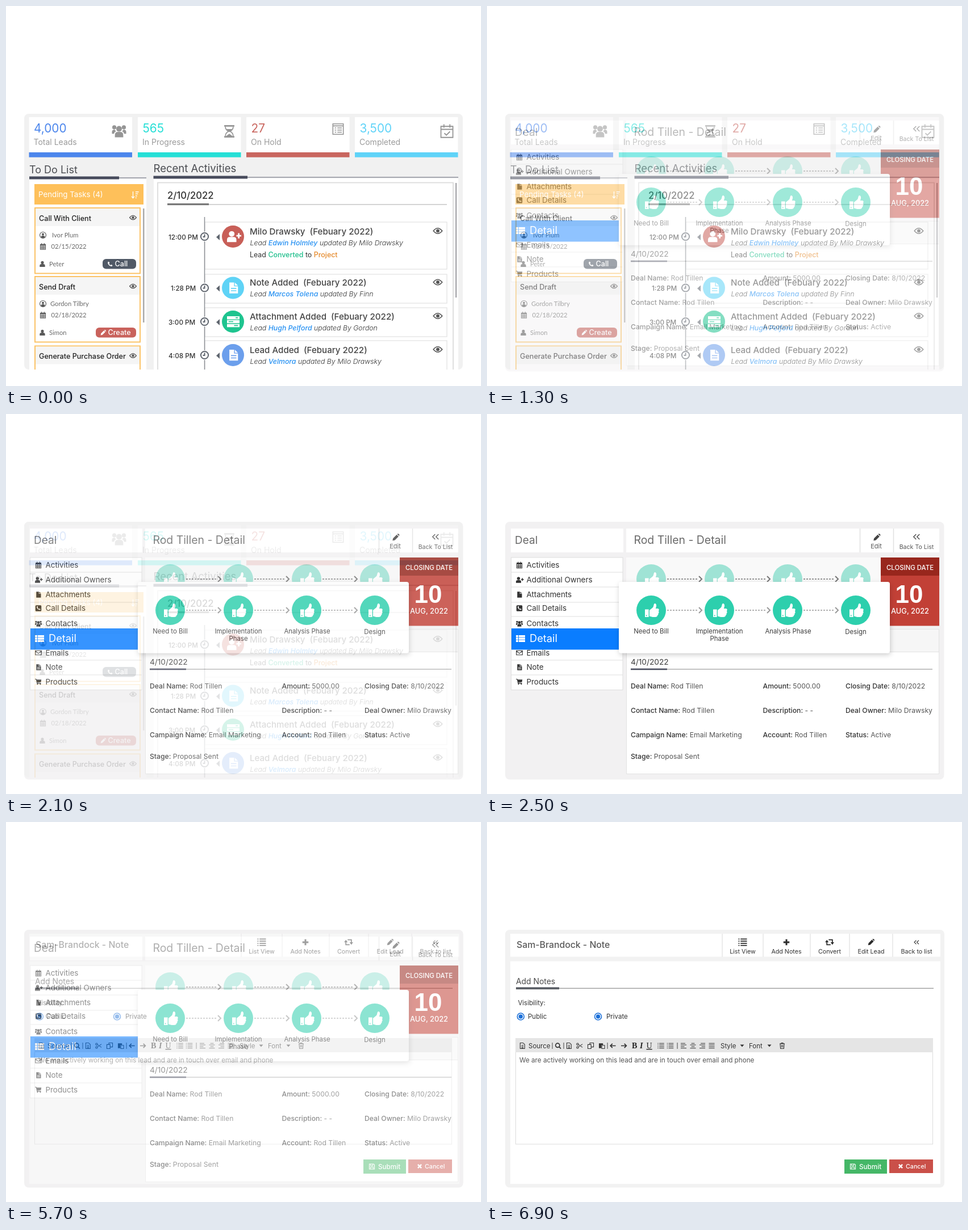
These frames come from a looping animation (836 by 670 pixels, 8 s). An HTML page:

```html
<!DOCTYPE html>
<html lang="en">
<head>
<meta charset="utf-8">
<title>Lead dashboard</title>
<style>
html, body { margin: 0; width: 100%; height: 100%; overflow: hidden; background: #fff; }
svg { display: block; width: 100%; height: 100%; }
text { font-family: Inter, sans-serif; white-space: pre; }
</style>
</head>
<body>
<svg id="stage" viewBox="0 0 836 670"></svg>
<script>
const LOOP = 8000, STEP = 200, STEPS = 11;
const dot = (x, y, r) => `M${x - r} ${y}a${r} ${r} 0 1 0 ${2 * r} 0a${r} ${r} 0 1 0 ${-2 * r} 0z`;

// Drawing helpers: each returns SVG markup
const rect = (x, y, w, h, fill, extra = '') =>
  `<rect x="${x}" y="${y}" width="${w}" height="${h}" fill="${fill}" ${extra}/>`;
const box = (x, y, w, h, stroke, sw = 1, fill = '#fff') =>
  rect(x, y, w, h, fill, `stroke="${stroke}" stroke-width="${sw}"`);
const line = (x1, y1, x2, y2, stroke, sw = 1, extra = '') =>
  `<path d="M${x1} ${y1}L${x2} ${y2}" stroke="${stroke}" stroke-width="${sw}" ${extra}/>`;
const disc = (x, y, r, fill) => `<circle cx="${x}" cy="${y}" r="${r}" fill="${fill}"/>`;
const text = (x, y, size, str, fill = '#333', weight = 400, extra = '') =>
  `<text x="${x}" y="${y}" font-size="${size}" fill="${fill}" font-weight="${weight}" ${extra}>${str}</text>`;
const mid = 'text-anchor="middle"';
const span = (str, fill, weight = 500) => `<tspan fill="${fill}" font-weight="${weight}">${str}</tspan>`;

// Icons in a 16-unit box around 0,0: [filled path, stroked path]
const calendar = 'M-6-5H6V7H-6zM-3-8v4M3-8v4';
const sheet = 'M-5-7H1V-2H6V7H-5zM2-7L6-3H2z';
const barsAt = (...ends) => ends.map(([a, b], i) => `M${a} ${i * 4 - 6}H${b}`).join('');
const body = 'M-6.5 7V4q0-4 4-4h5q4 0 4 4v3z';
const icons = {
  eye: [dot(0, 0, 2.8), 'M-7.3 0Q0-9 7.3 0Q0 9-7.3 0z'],
  user: [dot(0, -3.6, 3.6) + body],
  face: [dot(0, -2, 2.6) + 'M-4.5 5q0-4 4.5-4t4.5 4q-4.5 3-9 0z', dot(0, 0, 7)],
  userPlus: [dot(-2, -3.4, 3.6) + 'M-8 7V4q0-3.5 3.5-3.5h5Q4 .5 4 4v3zM4-2h2v-2.3h2V-2h2.2V0H8v2.3H6V0H4z'],
  users: [dot(0, -2.5, 3.2) + dot(-5.4, -4.2, 2.3) + dot(5.4, -4.2, 2.3) +
    'M-4.7 7V5q0-4 3-4h3.4q3 0 3 4v2zM-8 3V1q0-2.6 3-2.6L-3.4.3Q-5.4 1-5.6 3zM8 3V1q0-2.6-3-2.6L3.4.3Q5.4 1 5.6 3z'],
  hourglass: ['M-6.5-8h13v2h-13zM-6.5 6h13v2h-13zM-4-3h8L0 1zM-4 6L0 3L4 6z', 'M-5-6Q-5-2-1 0Q-5 2-5 6M5-6Q5-2 1 0Q5 2 5 6'],
  checklist: ['', 'M-7-7H7V7H-7zM-7-4.3H7M-4.5-1.5h2M-1-1.5h6M-4.5 1.3h2M-1 1.3h6M-4.5 4.2h2M-1 4.2h6'],
  calCheck: ['', 'M-7-5.5H7V7.5H-7zM-7-2H7M-3.5-8v4M3.5-8v4M-3 2.5L-.6 4.8L3.6.5'],
  calendar: ['M-6-5H6v3H-6z', calendar + 'M-6 1H6M-6 4H6M-2-2V7M2-2V7'],
  sort: ['', 'M-4-7V6M-7 3L-4 6.5L-1 3M1-6h6.5M1-2h5M1 2h3.5M1 6h2'],
  phone: ['M-6-6L-3-7L-1-3L-3-1Q-1 2 2 3L4 1L7 3.5L6 6Q1 8-4 2Q-7-2-6-6z'],
  pencil: ['M-7 7L-6 2L2-6L6-2L-2 6zM3-7L5-8Q8-7 8-5L7-3z'],
  file: [sheet + 'M-3 0V1.2H4V0zM-3 3V4.2H4V3z'],
  page: [sheet],
  server: ['M-8-7H8v4H-8zM-8-2H8v4H-8zM-8 3H8v4H-8zM3-5.6v1.2h3v-1.2zM-6-.6V.6H0V-.6zM1 4.4v1.2h5V4.4z'],
  clock: ['', dot(0, 0, 6.6) + 'M0-4V.6H-3'],
  thumb: ['M-8-1H-3.6V8H-8zM-6.8 5.6v1.2h1.2V5.6zM-2.7 0L1-3Q2-4 2.3-6Q2.5-8 4-8Q6.5-7 4.5-2H7Q9.3-1.5 8 1Q9 2.5 7.6 4Q8 5.6 6.7 6Q6.5 8 4 8H1L-2.7 7z'],
  call: ['M-5-7H5Q7-7 7-5V5Q7 7 5 7H-5Q-7 7-7 5V-5Q-7-7-5-7zM-4-4Q-4 3 4 4L5 2L2 .5L1 1.5Q-1.5 0-1.7-2L-.8-3L-2-5z'],
  mail: ['', 'M-7-5H7V5H-7zM-7-4L0 1.5L7-4'],
  cart: ['M-5-5H7L6 1L-3 2z' + dot(-2, 5.5, 1.5) + dot(4.5, 5.5, 1.5), 'M-8-6H-5L-3 3.5H6'],
  table: [[-6, -1.7, 2.6].map(y => `M-8 ${y}h4v3.4h-4zM-3 ${y}H8v3.4H-3z`).join('')],
  list: ['', [-6, -2, 2, 6].map(y => `M-8 ${y}h2M-4 ${y}H8`).join('')],
  plus: ['M-2-7H2V-2H7V2H2V7H-2V2H-7V-2H-2z'],
  cross: ['M-7-4L-4-7L0-3L4-7L7-4L3 0L7 4L4 7L0 3L-4 7L-7 4L-3 0z'],
  convert: ['M-9 0L-5.5-5L-2 0zM2 0L5.5 5L9 0z', 'M-5.5-1V5H2M5.5 1V-5H-2'],
  back: ['', 'M-1-6L-7 0L-1 6M7-6L1 0L7 6'],
  find: ['', dot(-1, -1, 5) + 'M3 3L7 7'],
  doc: ['', 'M-5-7H2L6-3V7H-5zM-2-1H3M-2 2H3M-2 5H3'],
  cut: ['', dot(-5, 4, 2.3) + dot(-5, -4, 2.3) + 'M-3-3L7 4M-3 3L7-4'],
  copy: ['', 'M-7-3H1V7H-7zM-2-3V-7H7V3H1'],
  paste: ['M-7-6H3V-2H-1V6H-7z', 'M0-1H7V7H0z'],
  left: ['', 'M7 0H-6M-1-5L-6 0L-1 5'],
  right: ['', 'M-7 0H6M1-5L6 0L1 5'],
  alignL: ['', barsAt([-7, 4], [-7, 7], [-7, 2], [-7, 7])],
  alignC: ['', barsAt([-4, 4], [-7, 7], [-4, 4], [-7, 7])],
  alignR: ['', barsAt([-4, 7], [-7, 7], [-2, 7], [-7, 7])],
  justify: ['', barsAt([-7, 7], [-7, 7], [-7, 7], [-7, 7])],
  trash: ['', 'M-6-5H6M-2-5V-7H2V-5M-5-5L-4 7H4L5-5M-1.5-2V4M1.5-2V4'],
  save: ['', 'M-6-6H4L6-4V6H-6zM-3-6V-2H2V-6M-3 6V1H3V6'],
};
function icon(name, x, y, size, color = '#333', sw = 1.5) {
  const [fill, stroke = ''] = icons[name];
  return `<g transform="translate(${x} ${y}) scale(${size / 16})">` +
    `<path d="${fill}" fill="${color}" fill-rule="evenodd"/>` +
    `<path d="${stroke}" fill="none" stroke="${color}" stroke-width="${sw}"/></g>`;
}

function heading(x, y, size, str, barEnd, lineEnd, barY, barH) {
  return text(x, y, size, str, '#4b4d52') + rect(x, barY, barEnd - x, barH, '#474b5c') +
    line(barEnd, barY + barH / 2, lineEnd, barY + barH / 2, '#5c6070');
}

function task(y, title, who, nameX, date, owner, button) {
  const grey = '#5a5a5a', small = (x, dy, s) => text(x, y + dy, 11.2, s, '#6a6a6a', 400, 'style="font-family:Lato,sans-serif"');
  let out = box(51, y, 185, 115.5, '#fbc367', 2) + rect(52, y + 1, 183, 31, '#f5f5f5') +
    text(58, y + 22.5, 12.6, title, '#222', 500) + icon('eye', 223.5, y + 17, 13, grey);
  if (!who) return out + icon('face', 65, y + 48, 12.5, grey);
  out += icon('face', 65, y + 48, 12.5, grey) + small(nameX, 52, who) +
    icon('calendar', 65, y + 68, 12, grey) + small(79.5, 71.5, date) +
    icon('user', 64, y + 99, 11.5, grey) + small(76, 103, owner);
  const [bx, label, color, glyph] = button;
  return out + rect(bx, y + 90, 229 - bx, 17.5, color, 'rx="6"') +
    icon(glyph, bx + 13, y + 99, 10, '#fff') + text(bx + 21.5, y + 103.3, 12.6, label, '#fff', 500);
}

function activity(y, h, cy, time, timeX, color, glyph, title, lead, by) {
  return box(350, y, 426, h, '#e4e4e4', 1.3) + text(timeX, cy + 5, 11.7, time, '#333', 500) +
    disc(349.5, cy, 9, '#fff') + icon('clock', 349.5, cy, 16, '#5f656e', 2) +
    `<path d="M370 ${cy + 1}l6-5.5v11z" fill="#5f656e"/>` + disc(399.5, cy, 19.5, color) +
    icon(glyph, 400, cy, 22, '#fff') +
    text(429, cy - 4, 15.1, title + '  (Febuary 2022)', '#444', 500) + icon('eye', 760, cy - 10, 17, '#555') +
    text(429.5, cy + 15, 12.3, `Lead ${span(lead, '#2590f2')} updated By ${by}`, '#333', 300, 'font-style="italic"');
}

function dashboard() {
  const cards = [
    [40.5, '4,000', 'Total Leads', '#4c86ec', 'users', 25, 199, 220.5],
    [232, '565', 'In Progress', '#25dfd6', 'hourglass', 22, 393, 221],
    [423, '27', 'On Hold', '#c9665f', 'checklist', 21, 584.5, 217],
    [614, '3,500', 'Completed', '#5fd3f8', 'calCheck', 24, 776, 220.5],
  ].map(([x, num, label, color, glyph, size, ix, iy]) =>
    rect(x, 196, 181.5, 62, '#fff') + rect(x, 258, 181.5, 8.7, color) + text(x + 8.5, 223, 20.8, num, color) +
    text(x + 8, 245, 14, label, '#9b9b9b') + icon(glyph, ix, iy, size, '#959595', 1.2));
  return `<g clip-path="url(#panel)">` + rect(32, 190, 772, 451, '#f1f1f1') + cards.join('') +
    rect(41, 305, 206, 340, '#fff') + rect(260, 304, 536, 340, '#fff') +
    heading(41, 294.5, 18, 'To Do List', 199, 247, 300.5, 5) +
    heading(259.5, 293, 18.5, 'Recent Activities', 425, 796, 299.5, 5) +
    rect(50, 314, 192, 36, '#fec05a') + text(57, 336.5, 13.3, 'Pending Tasks (4)', '#fff') +
    icon('sort', 227, 333, 14, '#fff') +
    task(356, 'Call With Client', 'Ivor Plum', 81, '02/15/2022', 'Peter', [170, 'Call', '#505966', 'phone']) +
    task(477, 'Send Draft', 'Gordon Tilbry', 78, '02/18/2022', 'Simon', [158, 'Create', '#c9625c', 'pencil']) +
    task(599.5, 'Generate Purchase Order') + rect(241, 357, 2.5, 201, '#aaa') +
    box(267, 311.5, 520, 350, '#dcdcdc', 1.8) + rect(791, 312, 2.2, 202, '#a3a3a8') +
    text(284, 340, 16.6, '2/10/2022', '#333', 500) + rect(284, 348, 73, 3.2, '#777') + line(357, 350, 776, 350, '#aaa') +
    activity(381, 83, 406.5, '12:00 PM', 286, '#c85f58', 'userPlus', 'Milo Drawsky', 'Edwin Holmley', 'Milo Drawsky') +
    text(429, 443, 12.4, `Lead ${span('Converted', '#1fbf8c')} to ${span('Project', '#e58a2c')}`) +
    activity(473, 51, 497, '1:28 PM', 290, '#5fd3f6', 'file', 'Note Added', 'Marcos Tolena', 'Finn') +
    activity(532, 51, 556.5, '3:00 PM', 286, '#1ec48f', 'server', 'Attachment Added', 'Hugh Pelford', 'Gordon') +
    activity(590, 60, 615.5, '4:08 PM', 286, '#6c9fec', 'file', 'Lead Added', 'Velmora', 'Milo Drawsky') +
    [[372, 398], [415, 488], [506, 548], [565, 607], [624, 641]].map(([a, b]) => line(349.5, a, 349.5, b, '#8c9096', 1.5)).join('') +
    '</g>';
}

function stages(y, color, stroke) {
  return [289, 409, 529, 649].map((x, i) =>
    disc(x, y, 26, color) + icon('thumb', x + 1, y, 24, '#fff') +
    (i < 3 ? line(x + 28, y, x + 83, y, stroke, 1.3, 'stroke-dasharray="3 2"') +
      `<path d="M${x + 84} ${y - 5}l5 5l-5 5" fill="none" stroke="${stroke}" stroke-width="2"/>` : '')).join('');
}

function deal() {
  const menu = [
    ['calendar', 'Activities', 271], ['userPlus', 'Additional Owners', 297], ['page', 'Attachments', 323],
    ['call', 'Call Details', 347], ['users', 'Contacts', 374], ['mail', 'Emails', 425.5],
    ['file', 'Note', 451], ['cart', 'Products', 476.5],
  ].map(([glyph, label, y]) => icon(glyph, 57, y - 4.5, 12) + text(69.5, y, 13.4, label));
  const fields = [
    [253, 484, 'Deal Name:', 'Rod Tillen'], [485.5, 484, 'Amount:', '5000.00'], [631, 484, 'Closing Date:', '8/10/2022'],
    [253, 527, 'Contact Name:', 'Rod Tillen'], [485.5, 527, 'Description:', '- -'], [631, 527, 'Deal Owner:', 'Milo Drawsky'],
    [253, 570, 'Campaign Name:', 'Email Marketing'], [485.5, 570, 'Account:', 'Rod Tillen'], [631, 570, 'Status:', 'Active'],
    [253, 608, 'Stage:', 'Proposal Sent'],
  ].map(([x, y, label, value]) => text(x, y, 12.2, span(label, '#333') + ' ' + value, '#555'));
  const labels = [[289, 387, 'Need to Bill'], [409, 387, 'Implementation'], [409, 399.5, 'Phase'],
    [530, 387, 'Analysis Phase'], [649, 388, 'Design']].map(([x, y, s]) => text(x, y, 11.4, s, '#3c3c3c', 400, mid));
  return rect(32, 190, 772.5, 454.5, '#f2f1f2', 'rx="8"') +
    rect(42, 202, 198, 42, '#fff') + rect(245, 202, 551, 42, '#fff') +
    line(656.5, 202, 656.5, 244, '#e0e0e0', 1.5) + line(715.5, 202, 715.5, 244, '#e0e0e0', 1.5) +
    text(49, 229, 19, 'Deal', '#6a6a6a') + text(258.5, 229, 19.4, 'Rod Tillen - Detail', '#6a6a6a') +
    icon('pencil', 686, 217.5, 13, '#444') + text(685, 237, 11, 'Edit', '#555', 400, mid) +
    icon('back', 756, 216.5, 12, '#444', 1.7) + text(756, 238, 10.6, 'Back To List', '#555', 400, mid) +
    box(42.5, 253, 196.5, 233.5, '#dedede') +
    [279, 305, 332, 357, 434, 460].map(y => line(43, y, 239, y, '#dedede')).join('') + menu.join('') +
    rect(43, 378, 190, 37.5, '#0a7dff') + icon('table', 59, 396, 16, '#fff') + text(75, 401.5, 18.2, 'Detail', '#fff') +
    rect(245, 253, 448, 121, '#f9f9f9') + stages(291, '#9fe3d5', '#777') +
    rect(693, 253, 103, 120.5, '#c24036') + rect(693, 253, 103, 32, '#98271d') +
    text(744.5, 274.5, 11.4, 'CLOSING DATE', '#fff', 500, mid) +
    text(743, 333, 44, '10', '#fff', 700, mid + ' style="font-family:Liberation Sans,Arial,sans-serif"') +
    text(744.5, 352, 12.8, 'AUG, 2022', '#fff', 500, mid) +
    box(245.5, 379.5, 550, 255, '#e2e2e2') + box(245.5, 379.5, 550, 40, '#e2e2e2', 1, '#f6f6f6') +
    text(253, 442, 13.7, '4/10/2022', '#3c3c3c') + line(253, 450, 784, 450, '#888') + rect(253, 448.7, 64, 2.6, '#4a4d5e') +
    fields.join('') + rect(232, 296, 477, 125.5, '#fff', 'rx="4" filter="url(#shadow)"') +
    stages(346, '#2dcfad', '#999') + labels.join('');
}

function note() {
  const actions = [[450, 'list', 'List View', 15], [527, 'plus', 'Add Notes', 12], [603, 'convert', 'Convert', 14],
    [676, 'pencil', 'Edit Lead', 12], [756, 'back', 'Back to list', 9]].map(([x, glyph, label, size]) =>
    icon(glyph, x, 212, size, '#2b2b2b', 2) + text(x, 232, 10.7, label, '#333', 400, mid));
  const radio = (x, label, lx) => `<circle cx="${x}" cy="343" r="6" fill="#fff" stroke="#1a6fd8" stroke-width="1.6"/>` +
    disc(x, 343, 3.7, '#1a6fd8') + text(lx, 347, 11.5, label);
  const tools = [['doc', 62], ['find', 125], ['doc', 144], ['cut', 163], ['copy', 182.5], ['paste', 202], ['left', 221.5],
    ['right', 241], ['list', 306], ['list', 322.5], ['alignL', 346], ['alignC', 362.5], ['alignR', 379], ['justify', 395.5],
    ['trash', 519.5]].map(([glyph, x]) => icon(glyph, x, 394.5, 11.5, '#333', /find|left|right/.test(glyph) ? 2.4 : 1.5));
  const serif = (x, s, style) => text(x, 399, 14, s, '#222', 400, `style="font-family:Liberation Serif,serif;${style}"`);
  const caret = x => `<path d="M${x - 3.5} 392.5h7l-3.5 4z" fill="#333"/>`;
  return rect(32, 190, 773, 454.5, '#f2f2f2', 'rx="8"') + rect(41, 197, 757, 40.5, '#fff') + rect(41, 245.5, 757, 392.5, '#fff') +
    [414, 486, 569, 638, 714].map(x => line(x, 197, x, 238, '#ececec', 2)).join('') +
    text(52, 222, 15.8, 'Sam-Brandock - Note', '#5a5a5a', 500) + actions.join('') +
    text(51, 286, 13.9, 'Add Notes', '#4a4a4a') + line(51, 293.2, 786, 293.2, '#777') + rect(51, 291.3, 76, 3.8, '#5b5f66') +
    text(54.5, 323, 11.4, 'Visibility:') + radio(59.3, 'Public', 72) + radio(195.5, 'Private', 210) +
    box(50.5, 381.5, 734, 186.5, '#dcdcdc') + rect(50, 381, 735, 25, '#e5e5e5') + tools.join('') +
    text(73, 398.5, 11.5, 'Source') + [115, 135, 212, 335].map(x => line(x, 389, x, 400, '#444')).join('') +
    serif(255, 'B', 'font-weight:700') + serif(269, 'I', 'font-style:italic;font-weight:700') + serif(280.5, 'U', 'text-decoration:underline') +
    text(411, 398.5, 11.5, 'Style') + caret(449) + text(461, 398.5, 11.5, 'Font') + caret(497) +
    text(57, 424, 11.7, 'We are actively working on this lead and are in touch over email and phone', '#555') +
    rect(629, 595, 75, 25, '#45b767') + icon('save', 644, 607.5, 12, '#fff') + text(655, 612, 11.7, 'Submit', '#fff', 500) +
    rect(708, 595, 77, 24, '#ca5049') + icon('cross', 728, 607, 9, '#fff') + text(737, 611, 10.7, 'Cancel', '#fff', 500);
}

const stage = document.getElementById('stage');
stage.innerHTML = `<defs><clipPath id="panel"><rect x="32" y="190" width="772" height="451" rx="8"/></clipPath>
  <filter id="shadow" x="-10%" y="-20%" width="120%" height="150%">
  <feDropShadow dx="1" dy="3" stdDeviation="4" flood-color="#000" flood-opacity=".2"/></filter></defs>` +
  [dashboard, deal, note].map(draw => `<g class="scene">${draw()}</g>`).join('');
const scenes = [...stage.querySelectorAll('.scene')];

// Each cross-fade moves in even steps
const fade = (t, start) => Math.min(STEPS, Math.max(0, Math.floor((t - start) / STEP) + 1)) / STEPS;

function render(now) {
  const t = now % LOOP, toDeal = fade(t, 500), toNote = fade(t, 4900);
  const opacity = [toDeal < 1 ? 1 : 0, toNote < 1 ? toDeal : 0, toNote];
  scenes.forEach((scene, i) => scene.setAttribute('opacity', opacity[i]));
  requestAnimationFrame(() => render(performance.now()));
}
render(performance.now());
</script>
</body>
</html>
```
